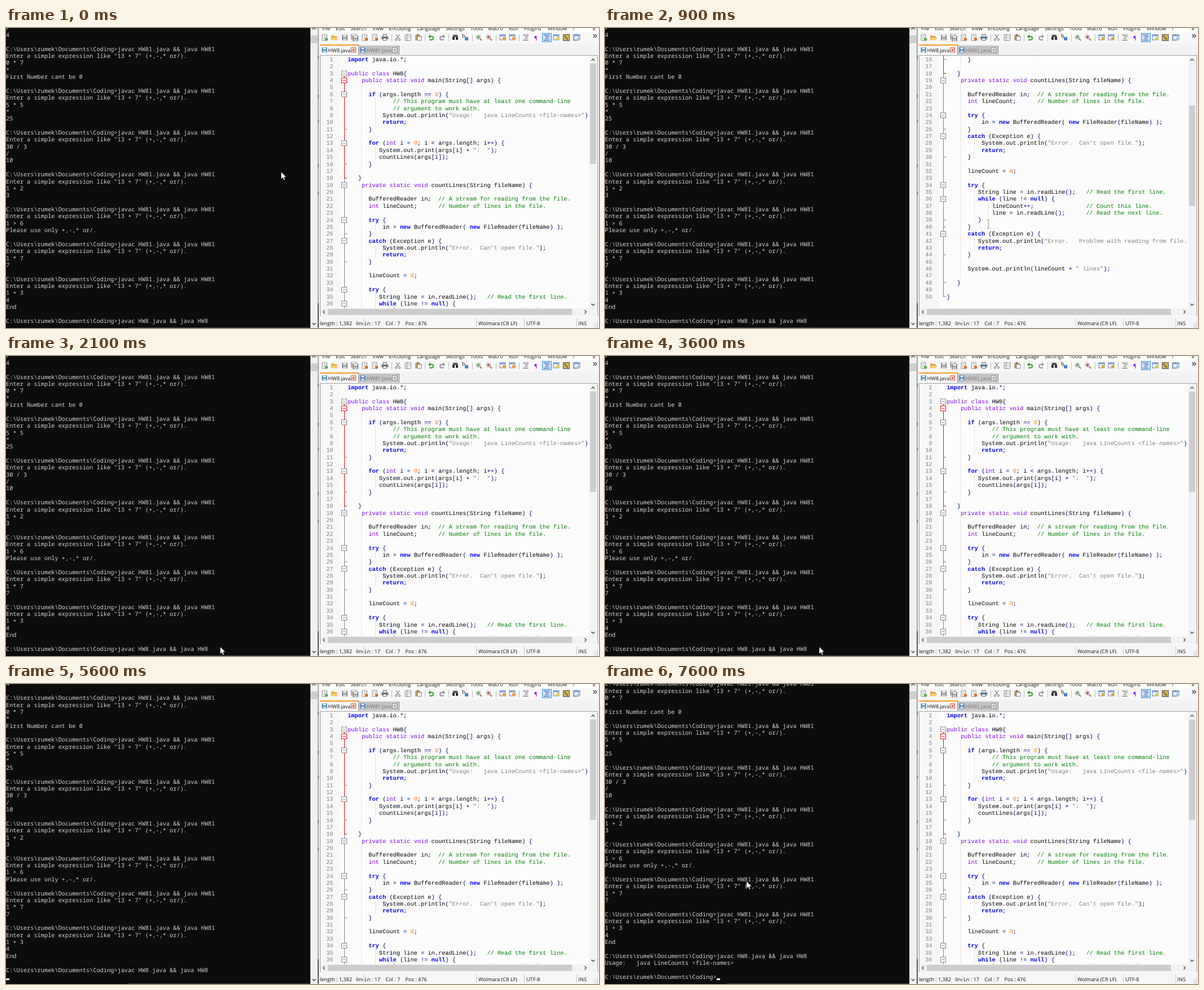
Write an HTML page that moves like this. It is 1052 px wide and 532 px high and loops after 8 s.

```html
<!DOCTYPE html>
<html lang="en">
<head>
<meta charset="utf-8">
<title>Terminal and editor</title>
<style>
@property --up { syntax: "<number>"; inherits: true; initial-value: 0; }
@property --top { syntax: "<number>"; inherits: true; initial-value: 0; }
html, body { margin: 0; width: 100%; height: 100%; overflow: hidden; background: #f0f0f0; }
svg { display: block; width: 100vw; height: 100vh; }
text { white-space: pre; text-rendering: geometricPrecision; }
.ui { font: 9.1px "Open Sans", "Noto Sans", sans-serif; fill: #111; }
.dim { fill: #777; }
.term { font: 10.31px "Noto Sans Mono", "DejaVu Sans Mono", monospace; fill: #d4d4d4; }
.code { font: 10.31px "Liberation Mono", monospace; fill: #000; }
.num { fill: #808080; text-anchor: end; }
.k { fill: #0000ff; font-weight: bold; }
.t { fill: #8000ff; }
.c { fill: #008000; }
.s { fill: #808080; }
.n { fill: #ff8000; }
.o { fill: #000080; }
.anim { animation: 8s step-end infinite; }
#term { animation-name: up; }
#editor { animation-name: top; }
#output { animation-name: output; }
#caret { animation-name: caret; }
#arrow { animation-name: arrow; }
#beam { animation-name: beam; }
#termRows { transform: translateY(calc(var(--up) * -12.37px)); }
#codeRows { transform: translateY(calc(var(--top) * -12.37px)); }
#thumb { transform: translateY(calc(var(--top) * 4.95px)); }

@keyframes up {
  0% { --up: 0; } 56.25% { --up: 1; } 73.75%, 100% { --up: 3; }
}
@keyframes output {
  0% { opacity: 0; } 73.75%, 100% { opacity: 1; }
}
@keyframes top {
  0% { --top: 0; } 7.5% { --top: 6; } 8.75% { --top: 12; } 11.25% { --top: 15; }
  13.75% { --top: 18; } 16.25% { --top: 21; } 17.5% { --top: 18; } 18.75% { --top: 12; }
  23.75% { --top: 6; } 25%, 100% { --top: 0; }
}
@keyframes caret {
  0%, 45% { transform: translate(-20px, 0); }
  38.75%, 50% { transform: translate(358.9px, 522px); }
  56.25%, 68.75% { transform: translate(0, 534.4px); }
  62.5% { transform: translate(-20px, 0); }
  73.75%, 100% { transform: translate(198px, 559.1px); }
}
@keyframes arrow {
  0% { transform: translate(488px, 255px); }
  1.25% { transform: translate(-40px, -40px); }
  26.25% { transform: translate(380px, 515.5px); }
  57.5% { transform: translate(381px, 515.5px); }
  61.25% { transform: translate(290px, 470px); }
  62.5% { transform: translate(120px, 425px); }
  63.75% { transform: translate(-40px, 392px); }
  68.75% { transform: translate(46px, 4px); }
  70% { transform: translate(-40px, -40px); }
  88.75% { transform: translate(15px, 2px); }
  90% { transform: translate(64px, 74px); }
  91.25% { transform: translate(113px, 146px); }
  93.75% { transform: translate(186px, 252px); }
  95%, 100% { transform: translate(251px, 349.5px); }
}
@keyframes beam {
  0% { transform: translate(-40px, 0); }
  1.25% { transform: translate(658px, 336px); }
  3.75% { transform: translate(680px, 348px); }
  13.75% { transform: translate(683px, 351px); }
  23.75%, 100% { transform: translate(-40px, 0); }
}
</style>
</head>
<body>
<svg id="stage" viewBox="0 0 1052 532" xmlns="http://www.w3.org/2000/svg"></svg>
<script>
const PITCH = 12.37, ADV = 6.187;
const esc = s => s.replace(/&/g, '&amp;').replace(/</g, '&lt;').replace(/>/g, '&gt;');
const rect = (x, y, w, h, fill, more = '') =>
  `<rect x="${x}" y="${y}" width="${w}" height="${h}" fill="${fill}" ${more}/>`;
const line = (d, color, w = 1, more = '') =>
  `<path d="${d}" fill="none" stroke="${color}" stroke-width="${w}" ${more}/>`;
const shape = (d, fill) => `<path d="${d}" fill="${fill}"/>`;
const circle = (x, y, r, fill, more = '') =>
  `<circle cx="${x}" cy="${y}" r="${r}" fill="${fill}" ${more}/>`;
const text = (x, y, s, cls = 'ui') => `<text x="${x}" y="${y}" class="${cls}">${s}</text>`;
const chevron = (x, y, dx, dy) => line(dx
  ? `M${x - dx * 1.5} ${y - 3}l${dx * 3} 3l${-dx * 3} 3`
  : `M${x - 3} ${y - dy * 1.5}l3 ${dy * 3}l3 ${-dy * 3}`, '#444', 1.3);

// Terminal
const PROMPT = 'C:\\Users\\rumek\\Documents\\Coding>';
const run = (...io) => ['', PROMPT + 'javac HW81.java && java HW81',
  'Enter a simple expression like "13 + 7" (+,-,* or/).', ...io];
const session = ['/', '4',
  ...run('0 * 7', '*', 'First Number cant be 0'),
  ...run('5 * 5', '*', '25'),
  ...run('30 / 3', '/', '10'),
  ...run('1 + 2', '3'),
  ...run('1 > 6', 'Please use only +,-,* or/.'),
  ...run('1 * 7', '7'),
  ...run('1 + 3', '4', 'End'),
  '', PROMPT + 'javac HW8.java && java HW8'];
const termRow = (s, i) => text(0, (15.8 + (i - 1) * PITCH).toFixed(2), esc(s), 'term');

function terminal() {
  const output = ['Usage:   java LineCounts <file-names>', '', PROMPT];
  return rect(0, 0, 540, 532, '#0c0c0c') +
    `<g id="term" class="anim" clip-path="url(#termClip)"><g id="termRows">` +
    session.map(termRow).join('') +
    `<g id="output" class="anim">${output.map((s, i) => termRow(s, session.length + i)).join('')}</g>` +
    rect(0, 0, 6.2, 3, '#f2f2f2', 'id="caret" class="anim"') + '</g></g>' +
    rect(217, 531, 323, 1, '#4a4a4a') +
    rect(540, 0, 13, 532, '#f0f0f0') + rect(540.5, 13, 12, 14, '#cdcdcd') +
    chevron(546.5, 1, 0, -1) + chevron(546.5, 524.5, 0, 1) +
    rect(553, 0, 4, 532, '#f0f0f0') + rect(553, 0, 1.5, 532, '#8c8c8c') + rect(553, 488, 1.5, 44, '#333') +
    [52, 121, 165, 244, 293].map(y => rect(553.5, y - 3, 1, 6, '#444')).join('');
}

// Editor
const program = `import java.io.*;

public class HW8{
    public static void main(String[] args) {

      if (args.length == 0) {
             // This program must have at least one command-line
             // argument to work with.
          System.out.println("Usage:   java LineCounts <file-names>");
          return;
      }

      for (int i = 0; i < args.length; i++) {
         System.out.print(args[i] + ":  ");
         countLines(args[i]);
      }

   }
    private static void countLines(String fileName) {

      BufferedReader in;  // A stream for reading from the file.
      int lineCount;      // Number of lines in the file.

      try {
          in = new BufferedReader( new FileReader(fileName) );
      }
      catch (Exception e) {
          System.out.println("Error.  Can't open file.");
          return;
      }

      lineCount = 0;

      try {
         String line = in.readLine();   // Read the first line.
         while (line != null) {
             lineCount++;               // Count this line.
             line = in.readLine();      // Read the next line.
         }
      }
      catch (Exception e) {
         System.out.println("Error.   Problem with reading from file. ");
         return;
      }

      System.out.println(lineCount + " lines");

   }

}`.split('\n');

const TOKEN = /(\/\/.*)|("[^"]*")|\b(import|if|return|for|new|try|catch|while|null)\b|\b(public|class|static|void|int|private)\b|\b(\d+)\b|([^\w\s"\/]+)/g;
const paint = s => s.replace(TOKEN, (m, ...g) =>
  `<tspan class="${'csktno'[g.slice(0, 6).findIndex(Boolean)]}">${esc(m)}</tspan>`);
const mid = n => 55.8 + (n - 1) * PITCH;

function folds() {
  const v = (a, b, color) => line(`M600.5 ${mid(a)}V${mid(b)}`, color);
  const tick = (n, color = '#808080') => line(`M600 ${mid(n)}h5`, color);
  const box = n => {
    const color = n === 4 ? '#ff0000' : '#808080', y = mid(n);
    return rect(595.5, y - 4.5, 9, 9, '#fff', `stroke="${color}"`) + line(`M597.5 ${y}h5`, color);
  };
  return v(3, 50, '#808080') + v(4, 18, '#ff0000') + tick(18, '#ff0000') +
    [11, 16, 26, 30, 39, 40, 44, 48, 50].map(n => tick(n)).join('') +
    [3, 4, 6, 13, 19, 24, 27, 34, 36, 41].map(box).join('');
}

function guides() {
  const guide = ([col, a, b]) => line(
    `M${606 + col * ADV} ${mid(a) - 6}V${mid(b) + 6}`, '#c8c8c8', 1, 'stroke-dasharray="1 1"');
  return [[4, 5, 17], [4, 20, 47], [8, 7, 10], [8, 14, 15], [8, 25, 25], [8, 28, 29],
    [8, 35, 39], [8, 42, 43], [12, 37, 38]].map(guide).join('');
}

function editor() {
  const rows = program.map((s, i) => {
    const y = (mid(i + 1) + 3.2).toFixed(2);
    return text(580.5, y, i + 1, 'code num') + text(606.2, y, paint(s), 'code');
  }).join('');
  return rect(557, 48, 492, 463, '#fcfcfc') + rect(558, 49, 35, 448, '#f7f7f7') +
    `<g id="editor" class="anim"><g clip-path="url(#codeClip)"><g id="codeRows">` +
    guides() + folds() + rows + '</g></g>' +
    rect(1035, 49, 13, 448, '#f3f3f3') + rect(1036, 63, 11, 178, '#cdcdcd', 'id="thumb"') + '</g>' +
    chevron(1041.5, 56.5, 0, -1) + chevron(1041.5, 490.5, 0, 1) +
    rect(558, 497, 490, 13, '#f3f3f3') + rect(571, 498, 433, 11, '#cdcdcd') +
    chevron(564, 503.5, -1, 0) + chevron(1028, 503.5, 1, 0) +
    line('M557.5 48V511M557 48.5H1049M1049.5 48V511', '#a0a0a0');
}

// Toolbar icons, each centred on x at height 17
const page = (x, w = 8) =>
  rect(x - w / 2, 12, w, 10, '#fff', 'stroke="#777" stroke-width=".9"') +
  line(`M${x - 2} 15.5h4M${x - 2} 18h4`, '#9ab');
const disk = (x, y = 17, c = '#8d8d8d') =>
  rect(x - 5, y - 5, 10, 10, c) + rect(x - 3, y - 4.5, 6, 3.5, '#eee') + rect(x - 3, y + 1, 6, 4, '#ccc');
const dot = (x, c) => circle(x + 3.5, 20, 2.7, c);
const lens = (x, c) => circle(x - 1, 16, 3.6, '#dfeaf2', 'stroke="#888" stroke-width=".8"') +
  line(`M${x + 2} 19l3 3`, '#a06a2a', 1.8) + circle(x - 1, 16, 2, c);
const pane = (x, c) => rect(x - 5, 12, 10, 9, '#fff', 'stroke="#557fb0"') +
  rect(x - 5, 12, 10, 2.5, '#6f9ad0') + rect(x, 16, 5, 5, c);
const lines = (x, c) => line(`M${x - 5} 12.5h10M${x - 2} 15.5h7M${x - 2} 18.5h5M${x - 5} 21.5h10`, c, 1.2);
const turn = (x, d, c) =>
  line(`M${x - 4 * d} 15h${4 * d}a3 3 0 0 ${d > 0 ? 1 : 0} 0 6h${-4 * d}`, c, 2) +
  shape(`M${x - 6 * d} 15l${4 * d} -4v8z`, c);

function toolbar() {
  const menu = { File: 561, Edit: 585, Search: 611, View: 650, Encoding: 679, Language: 729,
    Settings: 780, Tools: 824, Macro: 855, Run: 892, Plugins: 919, Window: 961, '?': 1005 };
  return rect(557, 0, 495, 8, '#fff') + rect(557, 8, 495, 20, '#f8f8f8') +
    Object.entries(menu).map(([s, x]) => text(x, 4.3, s)).join('') +
    line('M1041 0l4 4m0 -4l-4 4', '#444') +
    [684, 743, 785, 827, 869, 910].map(x => rect(x, 11, 1, 13, '#bbb')).join('') +
    page(565) + dot(565, '#5fb04a') +
    shape('M577 13h4l1 1.5h5v7h-10z', '#e0a93a') + shape('M579 17h10l-2 5h-10z', '#f6d272') +
    disk(601) + disk(617, 15.5, '#a5a5a5') + disk(620, 18.5) +
    page(636) + dot(636, '#e0662c') + page(654) + dot(654, '#e0662c') +
    rect(669, 11.5, 6, 4, '#fff', 'stroke="#666"') + rect(666, 15, 12, 5, '#6e7b88') +
    rect(669, 18, 6, 4, '#fff', 'stroke="#666"') +
    line('M692 11.5l5 7M698 11.5l-5 7', '#777', 1.2) +
    circle(692, 20.5, 1.7, 'none', 'stroke="#666"') + circle(698, 20.5, 1.7, 'none', 'stroke="#666"') +
    page(711, 6) + page(715, 7) +
    rect(726, 12, 9, 10, '#c79a55') + rect(729, 11, 3, 2, '#666') + rect(730, 15, 7, 7, '#fff', 'stroke="#5a86b8"') +
    turn(755, 1, '#3c9a3c') + turn(773, -1, '#999') +
    rect(792, 15, 4, 6, '#333') + rect(798, 15, 4, 6, '#333') + rect(793, 12, 8, 4, '#555') +
    text(809, 17, 'b') + rect(814, 16, 6, 6, '#4c86c6') +
    lens(839, '#3ca03c') + lens(857, '#d04030') +
    pane(881, '#f0a030') + pane(898, '#f0a030') +
    lines(922, '#555') + text(937, 20.5, '¶', 'ui t') +
    rect(951.5, 9.5, 16, 15, '#cce4f7', 'stroke="#3a8ad0"') + lines(959, '#1f3fae') +
    pane(976, '#f3c64a') + rect(988.5, 11.5, 11, 11, '#d8b24a', 'stroke="#555"') +
    line('M990 13l7 8', '#555', 1.5) + page(1010, 7) + pane(1013, '#a8c8e8') +
    chevron(1043, 14, 1, 0) + chevron(1046.5, 14, 1, 0);
}

function tabs() {
  const cross = (x, c) => rect(x - 4, 35, 8, 8, '#fff', `stroke="${c}"`) +
    line(`M${x - 2} 37l4 4m0 -4l-4 4`, c, 1.2);
  const icon = (x, c) => rect(x - 4.5, 34.5, 9, 9, c) + rect(x - 2.5, 35, 5, 3, '#fff') + rect(x - 2.5, 40, 5, 3.5, '#dbe8f5');
  return rect(557, 28, 495, 20, '#f3f3f3') +
    rect(557, 29, 68, 19, '#fafafa') + rect(557, 29, 68, 2.5, '#faaa3c') +
    rect(626, 31, 71, 16, '#c4c4c4') + line('M625.5 29V48M697.5 31V47', '#999') +
    icon(565, '#3f7fc4') + text(571.5, 42.5, 'HW8.java') + cross(616.5, '#c8402e') +
    icon(633, '#3f7fc4') + text(639.5, 42.5, 'HW81.java', 'ui dim') + cross(689.5, '#888');
}

function status() {
  const grip = [[1049, 522], [1049, 526], [1045, 526], [1049, 530], [1045, 530]];
  return rect(557, 511, 495, 21, '#f6f6f6') +
    `<g clip-path="url(#lengthClip)">${text(557, 526.5, 'length : 1,382   lines : 50')}</g>` +
    text(636, 526.5, 'Ln : 17    Col : 7    Pos : 476') +
    text(838, 526.5, 'Wolmara (CR LF)') + text(923, 526.5, 'UTF-8') + text(1015.5, 526.5, 'INS') +
    [634, 834, 919, 1012].map(x => rect(x, 515, 1, 15, '#c8c8c8')).join('') +
    grip.map(([x, y]) => rect(x - 1, y - 1, 2, 2, '#bbb')).join('');
}

const clip = (id, x, y, w, h) => `<clipPath id="${id}">${rect(x, y, w, h, '#000')}</clipPath>`;

document.getElementById('stage').innerHTML =
  clip('termClip', 0, 0, 540, 532) + clip('codeClip', 558, 49, 475, 448) + clip('lengthClip', 557, 511, 76, 21) +
  terminal() + toolbar() + tabs() + editor() + status() +
  `<g id="beam" class="anim">${line('M-2 -7.5h4M0 -7.5V7.5M-2 7.5h4', '#777', 0.8)}</g>` +
  `<g id="arrow" class="anim"><path d="M0 0V13L3 10.2L5 14.8L7.2 13.9L5.2 9.4H9.2Z" fill="#fff" stroke="#000" stroke-width=".6"/></g>`;
</script>
</body>
</html>
```
